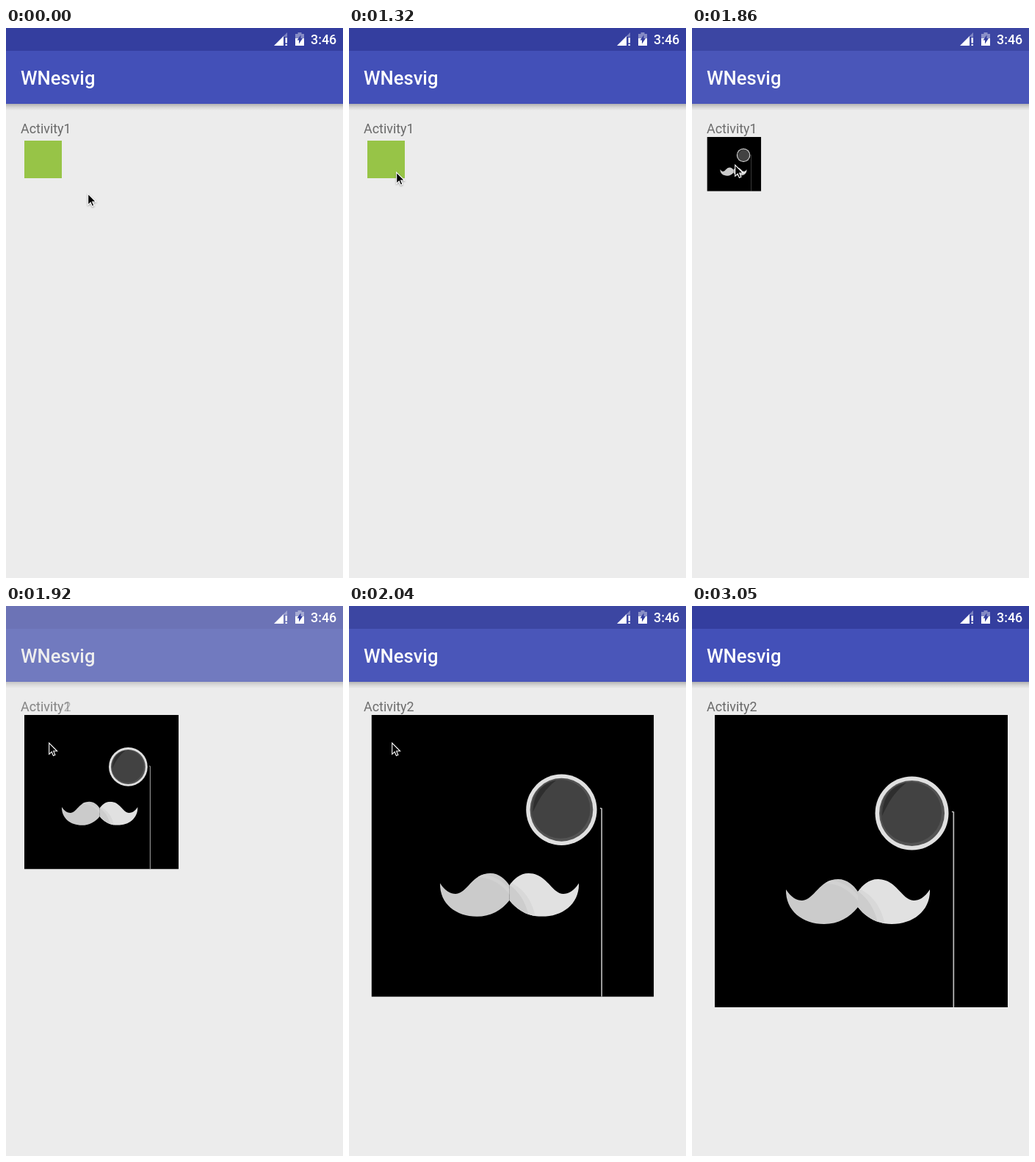
An HTML page that plays this animation: 459 px wide and 747 px high, repeating every 3260 ms.

```html
<!DOCTYPE html>
<html lang="en">
<head>
<meta charset="utf-8">
<title>Shared element transition</title>
<style>
  html, body { margin: 0; width: 100%; height: 100%; overflow: hidden; background: #ececec; }
  svg { display: block; width: 100vw; height: 100vh; }
  text { font-family: Roboto, sans-serif; font-size: 17.9px; fill: #696969; }
  .bold { font-weight: 500; fill: #fff; }
  #cursor { filter: drop-shadow(0 1px .8px rgba(0, 0, 0, .35)); }
</style>
</head>
<body>
<svg viewBox="0 0 459 747">
  <defs>
    <linearGradient id="shade" x2="0" y2="1">
      <stop stop-color="#000" stop-opacity=".25"/>
      <stop offset=".5" stop-color="#000" stop-opacity=".1"/>
      <stop offset="1" stop-color="#000" stop-opacity="0"/>
    </linearGradient>
    <path id="half" d="M97 237C104 248 112 252 119 252C136 251 142 223 168 223C180 223 189 231 195 240V261C184 275 168 284 149 284C120 284 96 266 97 237Z"/>
    <clipPath id="right"><use href="#half" transform="translate(390) scale(-1 1)"/></clipPath>
    <clipPath id="left"><use href="#half"/></clipPath>
    <clipPath id="lens"><circle cx="268.5" cy="133.5" r="44"/></clipPath>
    <clipPath id="frame"><path d="M0 0H399V397H0Z"/></clipPath>
  </defs>

  <rect width="459" height="747" fill="#ececec"/>
  <rect width="459" height="103" fill="#cdcdcd"/>
  <g id="bars">
    <rect y="103" width="459" height="9" fill="url(#shade)"/>
    <rect width="459" height="103" fill="#4350b8"/>
    <rect id="status" width="459" height="31" fill="#343e9f"/>
    <text class="bold" x="20" y="77" style="font-size:25.6px">WNesvig</text>
  </g>

  <g fill="#fff">
    <path d="M365 24L378 11V24Z"/>
    <path d="M378 11L383 6V12H378Z" opacity=".35"/>
    <path d="M380.5 13H383V20.5H380.5ZM380.5 22H383V24H380.5Z"/>
    <path d="M394 8H397.5V6H402.5V8H406V14H394Z" opacity=".4"/>
    <path d="M394 14H406V24H394Z"/>
    <path d="M401.5 9.5V14H404L399 21.5V16.5H396.5Z" fill="#343e9f"/>
  </g>
  <text class="bold" x="415" y="22">3:46</text>

  <text id="label1" x="20" y="143">Activity1</text>
  <text id="label2" x="20" y="143">Activity2</text>
  <rect id="icon" x="25" y="153" width="51" height="51" fill="#97c447"/>

  <g id="picture"><g clip-path="url(#frame)">
    <rect width="399" height="397"/>
    <circle cx="268.5" cy="133.5" r="50" fill="#e0e0e0"/>
    <circle cx="268.5" cy="133.5" r="44.5" fill="#535353"/>
    <circle cx="267.5" cy="132.5" r="41.5" fill="#424242"/>
    <path d="M228 137C229 110 241 96 261 92C247 103 238 115 228 137Z" fill="#2e2e2e" clip-path="url(#lens)"/>
    <path d="M323 131.2L325.3 132V397" fill="none" stroke="#bdbdbd" stroke-width="1.7"/>
    <use href="#half" fill="#cbcbcb"/>
    <path d="M150 226C180 227 205 250 210 284" fill="none" stroke="#d2d2d2" stroke-width="5" clip-path="url(#left)"/>
    <g clip-path="url(#right)">
      <rect x="190" y="215" width="110" height="75" fill="#e1e1e1"/>
      <path d="M190 233C214 242 227 260 232 286H190Z" fill="#d8d8d8"/>
      <path d="M190 236C207 246 218 262 223 286H190Z" fill="#cdcdcd"/>
    </g>
  </g></g>

  <path id="cursor" d="M.7 1V16.3L4.2 13L6.4 18.3L8.9 17.2L6.7 12H11.6Z" stroke="#fff" stroke-width="1.1"/>
</svg>
<script>
const LOOP = 3260;
const $ = id => document.getElementById(id);
const lerp = (a, b, p) => a + (b - a) * p;
const clamp = v => Math.min(1, Math.max(0, v));
const smooth = p => p * p * (3 - 2 * p);
const linear = p => p;

// cubic-bezier(.4, 0, .2, 1)
function standard(x) {
  let lo = 0, hi = 1, s = x;
  for (let i = 0; i < 24; i++) {
    s = (lo + hi) / 2;
    const bx = 1.2 * s * (1 - s) ** 2 + .6 * s * s * (1 - s) + s ** 3;
    if (bx < x) lo = s; else hi = s;
  }
  return smooth(s);
}

// Cursor moves: start, end, from, to, easing
const moves = [
  [60, 420, [111, 224], [64, 196], smooth],
  [1260, 1320, [64, 196], [64, 195], smooth],
  [1320, 1380, [64, 195], [62, 191], smooth],
  [1800, 1860, [62, 191], [58, 185], smooth],
  [2220, 2750, [58, 185], [335, 687], smooth],
  [2750, 3050, [335, 687], [430, 750], linear],
];

function cursorAt(t) {
  const [start, end, from, to, ease] = moves.filter(m => m[0] <= t).pop() || moves[0];
  const p = ease(clamp((t - start) / (end - start)));
  return from.map((v, i) => lerp(v, to[i], p));
}

// The picture advances in 60 ms ticks, with one short tick before 2570 ms
function tick(t) {
  const base = t < 2570 ? 0 : 2570;
  return base + Math.floor((t - base) / 60) * 60;
}

function draw(t) {
  const x = clamp((t - 1826) / 287);
  const p = x === 0 || x === 1 ? x : standard(x);
  const fade = p * (1 - p);
  const opened = t >= 1800;

  $("bars").setAttribute("opacity", 1 - 1.38 * fade);
  $("status").setAttribute("opacity", 1 - 2 * fade);
  $("label1").setAttribute("opacity", 1 - p);
  $("label2").setAttribute("opacity", p);
  $("icon").style.display = opened ? "none" : "";
  $("picture").style.display = opened ? "" : "none";
  $("picture").setAttribute("transform",
    `translate(${lerp(20, 31, p)} 148) scale(${lerp(61, 399, p) / 399} ${lerp(61, 397, p) / 397})`);

  $("cursor").setAttribute("transform", `translate(${cursorAt(t)})`);
  $("cursor").style.display = t < 3050 ? "" : "none";
}

const begin = performance.now();
function loop() {
  draw(tick((performance.now() - begin) % LOOP));
  requestAnimationFrame(loop);
}
loop();
</script>
</body>
</html>
```
